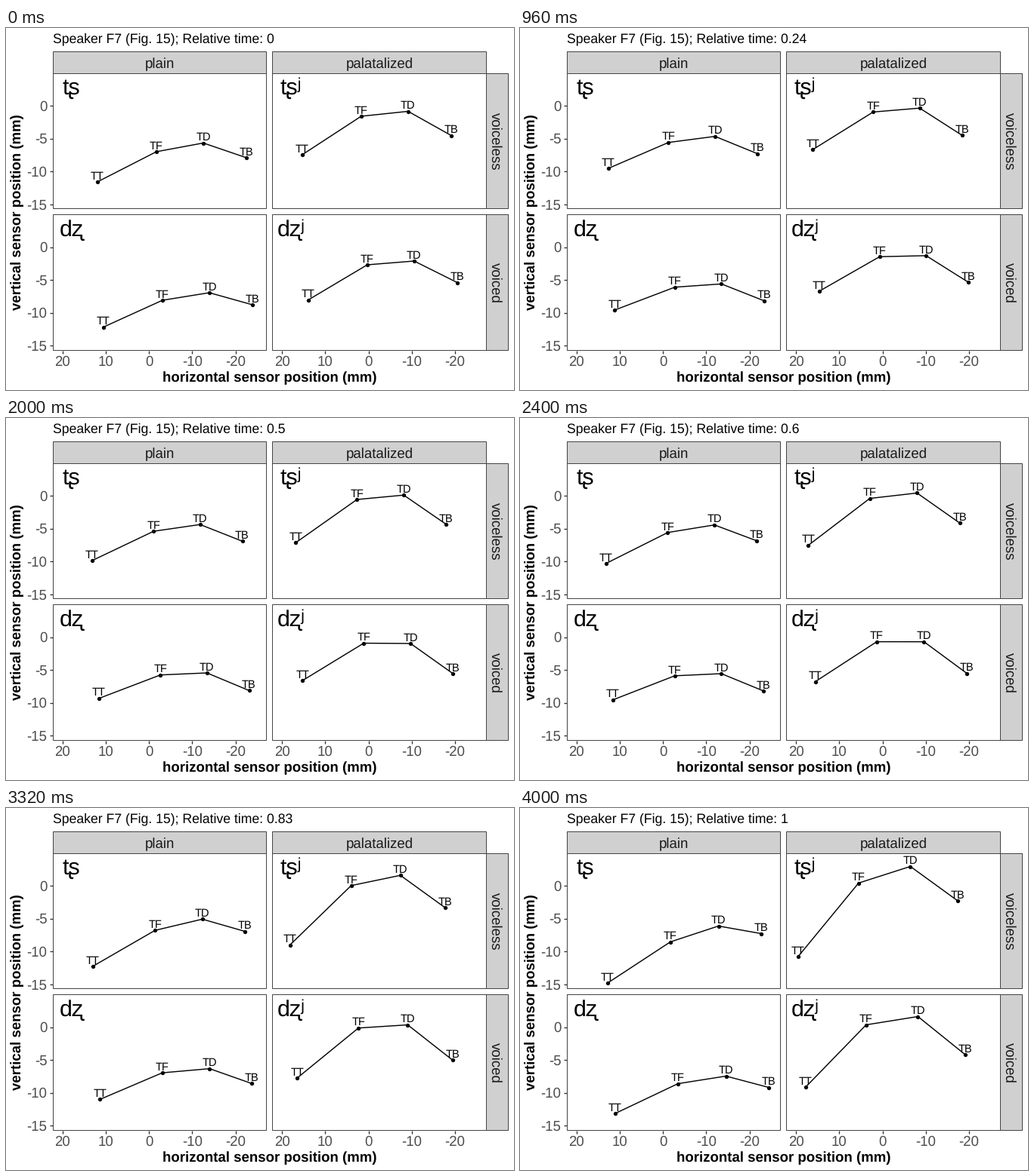
A matplotlib script for the animation above (4040 ms loop, 672x480 px).

```python
import numpy as np
import matplotlib.pyplot as plt
from matplotlib.animation import FuncAnimation
from matplotlib.patches import Rectangle

W, H, DPI = 672, 480, 96
FRAMES, INTERVAL = 101, 40
EDGE, TICK, GREY, STRIP = "#444444", "#333333", "#4d4d4d", "#d0d0d0"
SENSORS = ("TT", "TF", "TD", "TB")
COL_STEP, ROW_STEP = 290.4, 187.5

plt.rcParams["font.family"] = ["Liberation Sans", "DejaVu Sans"]
plt.rcParams["text.hinting"] = "none"

fig = plt.figure(figsize=(W / DPI, H / DPI), dpi=DPI, facecolor="white")
ax = fig.add_axes([0, 0, 1, 1])
ax.set(xlim=(0, W), ylim=(H, 0))
ax.axis("off")


def vec(*values):
    """One value per sensor."""
    return np.array(values, float)


def pose(t, palatal, voiced):
    """Sensor positions in pixels: a base gesture plus two additive effects."""
    onset = np.exp(-t / .06)
    arch = np.sin(np.pi * t)

    x = (vec(121, 199, 261, 318) + vec(-5, 0, 1.5, 1) * t
         - vec(4.5, 3.7, 5, 6) * arch)
    y = (vec(188, 157, 148.5, 171) + vec(16, 7, 4, 1) * onset
         - vec(12, 25, 22, 19) * t + vec(56, 45.5, 30, 14.5) * t**3)

    if voiced:
        x += 8 + 2 * t
        y += (vec(5, 5.5, 7, 4.5) + vec(0, 4, 4, 3) * onset
              + vec(-19.5, -5, 4.5, 12) * t)
    if palatal:
        x -= 19.5 + vec(19, 22, 17, 11) * t**3.5
        y += (vec(-28, -43, -41, -29.5) - vec(8, 4, 1, 0) * onset
              + vec(14, 14, 18, 24) * t - vec(21, 49, 56, 38) * t**3)
    return x + COL_STEP * palatal, y + ROW_STEP * voiced


def text(x, y, s, size=14, ha="center", **kw):
    return ax.text(x, y, s, fontsize=size, ha=ha, va="baseline",
                   rotation_mode="anchor", **kw)


def box(x0, y0, x1, y1, fill="none"):
    ax.add_patch(Rectangle((x0, y0), x1 - x0, y1 - y0, fc=fill, ec=EDGE,
                           lw=.75, zorder=1))


def tick(xs, ys):
    ax.plot(xs, ys, color=TICK, lw=1, solid_capstyle="butt")


class Tongue:
    """Four labelled sensors joined by a line."""

    def __init__(self, palatal, voiced):
        self.kind = palatal, voiced
        symbol = ("dʐ" if voiced else "tʂ") + "ʲ" * palatal
        text(86.7 + COL_STEP * palatal, 88 + ROW_STEP * voiced, symbol, 22.8)
        self.line, = ax.plot([], [], "o-", color="black", lw=1.07, ms=4,
                             mew=0, solid_joinstyle="round")
        self.labels = [text(0, 0, s, 11) for s in SENSORS]

    def show(self, t):
        xs, ys = pose(t, *self.kind)
        self.line.set_data(xs, ys)
        for label, x, y in zip(self.labels, xs, ys):
            label.set_position((x, y - 3.3))


cols = ((62, 344, "plain"), (352, 635, "palatalized"))
rows = ((60, 239, "voiceless"), (247, 427, "voiced"))

for col, (x0, x1, name) in enumerate(cols):
    box(x0, 31, x1, 60, STRIP)
    text((x0 + x1) / 2 + .5, 53, name, color="#1a1a1a")
    for mm in range(20, -21, -10):
        x = 189.2 + COL_STEP * col - 5.725 * mm
        tick([x, x], [428, 432])
        text(x, 448, str(mm), color=GREY)
    for y0, y1, _ in rows:
        box(x0, y0, x1, y1)

for row, (y0, y1, name) in enumerate(rows):
    box(635, y0, 664, y1, STRIP)
    text(642, (y0 + y1) / 2 + .5, name, color="#1a1a1a", rotation=270)
    for mm in range(0, -16, -5):
        y = 103 + ROW_STEP * row - 8.71 * mm
        tick([58, 62], [y, y])
        text(54.5, y + 6.7, str(mm), ha="right", color=GREY)

text(349, 469, "horizontal sensor position (mm)", weight="bold")
text(20, 244, "vertical sensor position (mm)", weight="bold", rotation=90)
title = text(61.5, 19, "", 13.2, ha="left")
tongues = [Tongue(p, v) for v in (0, 1) for p in (0, 1)]


def update(i):
    t = i / (FRAMES - 1)
    title.set_text(f"Speaker F7 (Fig. 15); Relative time: {t:g}")
    for tongue in tongues:
        tongue.show(t)


anim = FuncAnimation(fig, update, frames=FRAMES, interval=INTERVAL,
                     repeat=True, repeat_delay=0)
plt.show()
```
